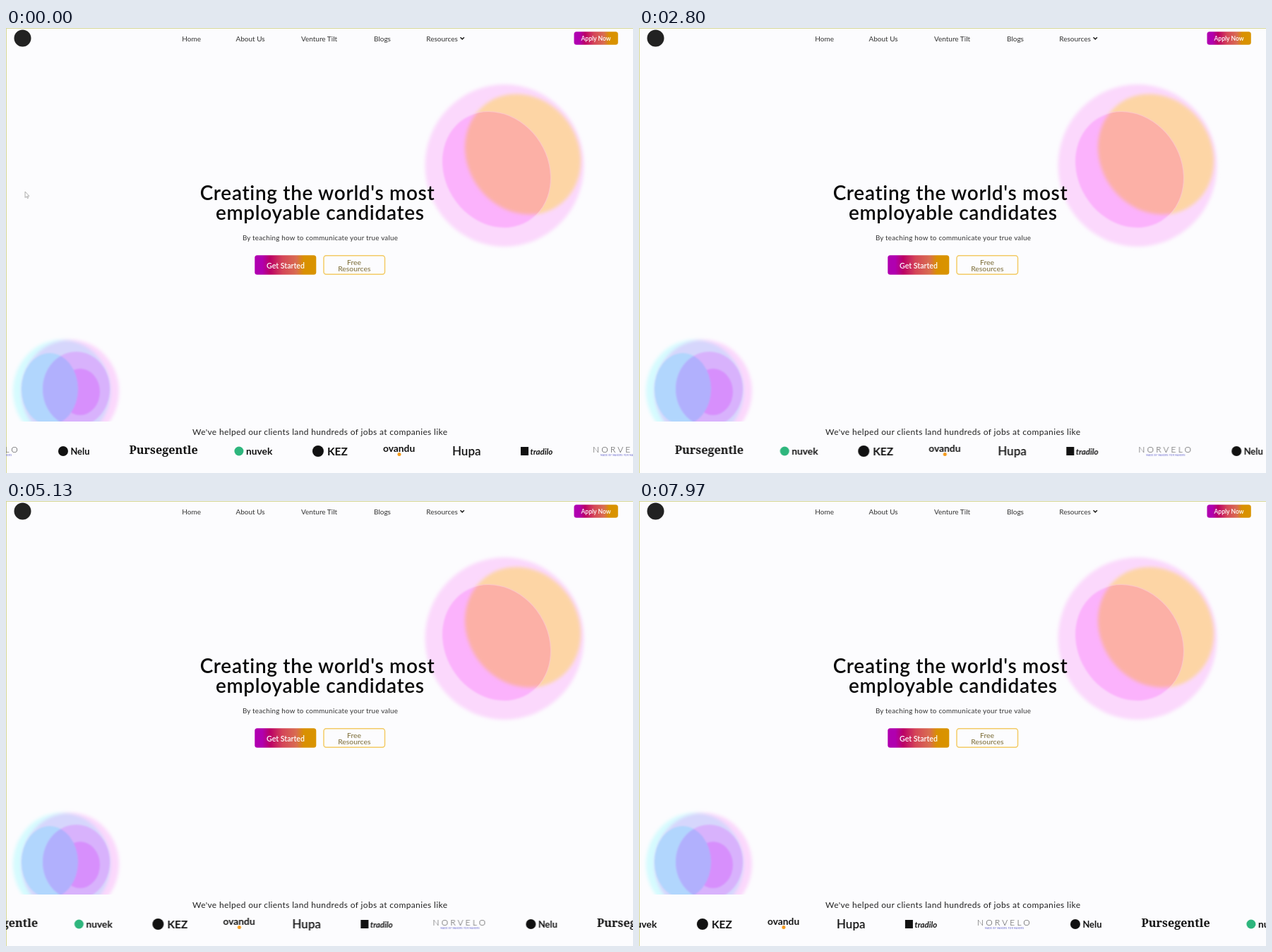
Write an HTML page that moves like this. It is 888x631 px and loops after 8000 ms.

```html
<!DOCTYPE html>
<html lang="en">
<head>
<meta charset="utf-8">
<title>Landing page</title>
<style>
  html, body { margin: 0; width: 100%; height: 100%; overflow: hidden; background: #fcfcfe; }
  svg { display: block; width: 888px; height: 631px; font-family: Lato, "Open Sans", sans-serif; }
  .mid { text-anchor: middle; }
  .nav { font-size: 10px; fill: #333; }
  .title { font-size: 28px; font-weight: 600; letter-spacing: .66px; fill: #0a0a0a; }
  .lead { font-size: 9.8px; letter-spacing: .23px; fill: #333; }
  .clients { font-size: 12px; letter-spacing: .36px; fill: #222; }
  .cta { font-weight: 600; fill: #fff; }
  .ghost { font-size: 10.4px; fill: #7a6a34; }
  .brands { font-weight: 700; fill: #111; }
  .marquee { animation: scroll 8s linear infinite; }
  .pointer { animation: point 8s linear infinite; }
  @keyframes scroll { to { transform: translateX(-353.4px); } }
  @keyframes point {
    0% { transform: translate(27px, 232px); opacity: 1; }
    25%, 31% { transform: translate(47px, 234px); opacity: 1; }
    31.01%, 100% { transform: translate(47px, 234px); opacity: 0; }
  }
</style>
</head>
<body>
<svg viewBox="0 0 888 631">
  <defs>
    <linearGradient id="sunset">
      <stop offset=".12" stop-color="#b000b0"/>
      <stop offset=".25" stop-color="#bb0066"/>
      <stop offset=".45" stop-color="#d44558"/>
      <stop offset=".68" stop-color="#d96d50"/>
      <stop offset=".8" stop-color="#d99000"/>
      <stop offset="1" stop-color="#d99400"/>
    </linearGradient>
    <filter id="soft"><feGaussianBlur stdDeviation="2.6"/></filter>
    <filter id="faint"><feGaussianBlur stdDeviation="1"/></filter>

    <ellipse id="rose" cx="694.5" cy="201" rx="85.4" ry="72.7" transform="rotate(58 694.5 201)"/>
    <ellipse id="amber" cx="732" cy="179" rx="88.5" ry="78.5" transform="rotate(55 732 179)"/>
    <ellipse id="cyan" cx="79" cy="515" rx="69" ry="73"/>
    <ellipse id="blush" cx="91" cy="515" rx="69" ry="73"/>
    <ellipse id="sky" cx="62" cy="512" rx="40" ry="51"/>
    <ellipse id="violet" cx="99.5" cy="512" rx="47.5" ry="53"/>
    <clipPath id="inRose"><use href="#rose"/></clipPath>
    <clipPath id="inCyan"><use href="#cyan"/></clipPath>
    <clipPath id="inSky"><use href="#sky"/></clipPath>
    <clipPath id="hero"><rect width="888" height="558"/></clipPath>

    <g id="brands" class="brands">
      <circle cx="81" cy="600" r="7"/>
      <text x="91.5" y="604.5" font-size="12.8">Nelu</text>
      <text x="174.5" y="604" font-size="16.2" font-family="'Noto Serif', serif">Pursegentle</text>
      <circle cx="330" cy="600" r="6.5" fill="#2eb67d"/>
      <text x="340" y="604.5" font-size="13.8">nuvek</text>
      <circle cx="442" cy="600" r="8"/>
      <text x="455" y="606" font-size="15.5">KEZ</text>
      <text x="534" y="601" font-size="13.8">ovandu</text>
      <circle cx="557" cy="604.5" r="2.5" fill="#f59a1b"/>
      <text x="632" y="606" font-size="17" font-weight="600">Hupa</text>
      <rect x="729" y="594" width="11" height="12"/>
      <text x="742.5" y="604.5" font-size="11.5" font-style="italic">tradilo</text>
      <text x="831" y="602" font-size="12" font-weight="300" letter-spacing="3.2" fill="#444">NORVELO</text>
      <text x="842" y="606.5" font-size="3" font-weight="400" letter-spacing=".4" fill="#5555c8">MADE BY MAKERS FOR MAKERS</text>
    </g>
  </defs>

  <rect width="888" height="631" fill="#fcfcfe"/>

  <ellipse cx="706" cy="195" rx="112.5" ry="115" fill="#fbd8fc" filter="url(#soft)"/>
  <use href="#amber" fill="#fdd5a5" filter="url(#soft)"/>
  <use href="#rose" fill="#fbb2fc" filter="url(#faint)"/>
  <g clip-path="url(#inRose)"><use href="#amber" fill="#fcb0a6" filter="url(#soft)"/></g>

  <g clip-path="url(#hero)">
    <g filter="url(#soft)">
      <use href="#cyan" fill="#d5fbfe"/>
      <use href="#blush" fill="#fbd8fc"/>
      <g clip-path="url(#inCyan)"><use href="#blush" fill="#d6d6fc"/></g>
    </g>
    <g filter="url(#faint)">
      <use href="#sky" fill="#b1d6fd"/>
      <use href="#violet" fill="#d8b2fc"/>
      <ellipse cx="105" cy="516" rx="28" ry="33" fill="#d78ffc"/>
      <g clip-path="url(#inSky)"><use href="#violet" fill="#b1b0fd"/></g>
    </g>
  </g>

  <path d="M0 .5H888M.5 0V631" stroke="#d6d796"/>

  <circle cx="23.5" cy="14.5" r="12" fill="#222"/>
  <g class="nav mid">
    <text x="262.7" y="18.5">Home</text>
    <text x="346" y="18.5">About Us</text>
    <text x="443.5" y="18.5">Venture Tilt</text>
    <text x="533" y="18.5">Blogs</text>
    <text x="617.5" y="18.5">Resources</text>
  </g>
  <path d="M643.5 13.2l2.7 2.7 2.7-2.7" fill="none" stroke="#222" stroke-width="1.5"/>
  <rect x="804.5" y="5.3" width="62.3" height="18.5" rx="3.5" fill="url(#sunset)"/>
  <text class="cta mid" x="835.5" y="18" font-size="8.6">Apply Now</text>

  <g class="title mid">
    <text x="441" y="243.5">Creating the world's most</text>
    <text x="444.8" y="271.5">employable candidates</text>
  </g>
  <text class="lead mid" x="445" y="300.5">By teaching how to communicate your true value</text>

  <rect x="352.3" y="322.2" width="87" height="27.5" rx="3.5" fill="url(#sunset)"/>
  <text class="cta mid" x="396" y="340.5" font-size="10.6">Get Started</text>
  <rect x="450" y="322.7" width="86.5" height="26.6" rx="3.5" fill="none" stroke="#f3cb66" stroke-width="1.5"/>
  <g class="ghost mid">
    <text x="493" y="335.7">Free</text>
    <text x="493.3" y="345.2">Resources</text>
  </g>

  <text class="clients mid" x="444.7" y="576.5">We've helped our clients land hundreds of jobs at companies like</text>

  <g class="marquee">
    <use href="#brands" x="-889"/>
    <use href="#brands"/>
    <use href="#brands" x="889"/>
  </g>

  <path class="pointer" d="M0 0V8.5L2 6.8 3.4 9.6 4.6 9 3.3 6.3H5.8Z" fill="#fff" stroke="#999" stroke-width=".8"/>
</svg>
</body>
</html>
```
